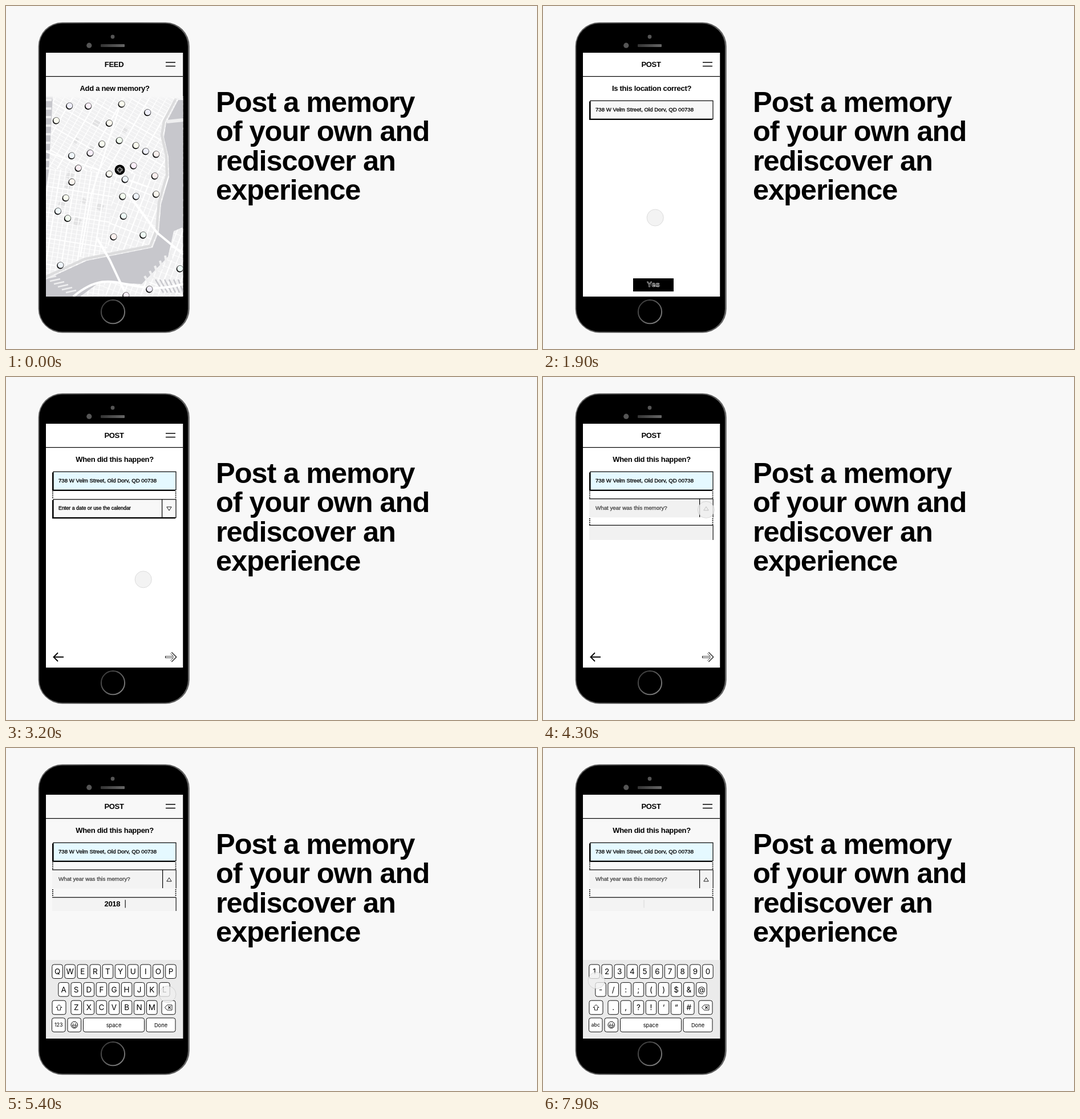
Write an HTML page with a canvas that moves like this. It is 931x602 px and loops after 8 s.

```html
<!DOCTYPE html>
<html lang="en">
<head>
<meta charset="utf-8">
<title>Post a memory</title>
<style>
  html, body { margin: 0; width: 100%; height: 100%; overflow: hidden; background: #f8f8f8; }
  canvas { display: block; }
</style>
</head>
<body>
<canvas id="stage" width="931" height="602"></canvas>
<script>
const LOOP = 8000, STEP = 100;
const FONT = '"Liberation Sans", Arial, sans-serif';
const KEY_FONT = 'Inter, "Liberation Sans", sans-serif';
const ADDRESS = '738 W Velm Street, Old Dorv, QD 00738';
const PAPER = '#f8f8f8', BLUE = '#e5f9ff';

const main = document.getElementById('stage').getContext('2d');
const buffer = Object.assign(document.createElement('canvas'), { width: 931, height: 602 }).getContext('2d');
let g = main;

const clamp = v => Math.max(0, Math.min(1, v));
const ramp = (t, from, to) => clamp((t - from) / (to - from));
const easeOut = p => 1 - Math.pow(1 - p, 2.5);
const mix = (a, b, p) => a + (b - a) * p;

function seeded(seed) {
  return (min, max) => {
    seed = (seed * 16807) % 2147483647;
    return mix(min, max, seed / 2147483647);
  };
}

function rect(x, y, w, h, color) {
  g.fillStyle = color;
  g.fillRect(x, y, w, h);
}

function paint(fill, stroke, width = 1) {
  if (fill) { g.fillStyle = fill; g.fill(); }
  if (stroke) { g.strokeStyle = stroke; g.lineWidth = width; g.stroke(); }
}

function rounded(x, y, w, h, r, fill, stroke, width) {
  g.beginPath();
  g.roundRect(x, y, w, h, r);
  paint(fill, stroke, width);
}

function circle(x, y, r, fill, stroke, width) {
  g.beginPath();
  g.arc(x, y, r, 0, Math.PI * 2);
  paint(fill, stroke, width);
}

function trace(points, closed) {
  g.beginPath();
  for (let i = 0; i < points.length; i += 2) g.lineTo(points[i], points[i + 1]);
  if (closed) g.closePath();
}

function line(points, color = '#000', width = 1, closed = false) {
  trace(points, closed);
  paint(null, color, width);
}

function shape(points, color) {
  trace(points, true);
  paint(color);
}

function text(str, x, y, font, { color = '#000', align = 'left', spacing = 0, thicken = 0 } = {}) {
  g.font = font;
  g.textAlign = align;
  g.letterSpacing = spacing + 'px';
  g.fillStyle = g.strokeStyle = color;
  g.fillText(str, x, y);
  if (thicken) { g.lineWidth = thicken; g.strokeText(str, x, y); }
  g.letterSpacing = '0px';
}

const bold = (str, x, y, align = 'center') =>
  text(str, x, y, `bold 13px ${FONT}`, { align, spacing: -0.3 });
const label = (str, y, size, color) =>
  text(str, 92, y, `${size}px ${FONT}`, { color, thicken: 0.3 });

function gradient(x0, y0, x1, y1, ...colors) {
  const fill = g.createLinearGradient(x0, y0, x1, y1);
  colors.forEach((c, i) => fill.addColorStop(i / (colors.length - 1), c));
  return fill;
}

// Draws a screen as one group, so overlapping parts fade together.
function show(draw, alpha) {
  if (alpha <= 0) return;
  if (alpha >= 1) return draw();
  g = buffer;
  g.clearRect(0, 0, 931, 602);
  draw();
  g = main;
  g.globalAlpha = alpha;
  g.drawImage(buffer.canvas, 0, 0);
  g.globalAlpha = 1;
}

/* ---------- phone ---------- */

function drawPhone() {
  rounded(56.6, 28.8, 265.2, 544.6, 42, gradient(57, 0, 321, 0, '#666', '#444', '#444', '#666'));
  rounded(58.4, 30.8, 260.6, 540.6, 40, '#000');
  circle(187, 54, 3.4, '#555');
  circle(145.8, 69.2, 4.6, '#555');
  rounded(166, 67, 42, 5, 1, gradient(166, 0, 208, 0, '#333', '#666'));
  circle(187.5, 536.7, 20.6, '#000', gradient(167, 517, 208, 557, '#333', '#888'), 2);
}

function drawHeadline() {
  ['Post a memory', 'of your own and', 'rediscover an', 'experience'].forEach((row, i) =>
    text(row, 368, 185.5 + i * 51.6, `bold 50.5px ${FONT}`, { spacing: -1.05 }));
}

function drawHeader(title, question, { back = '#fff', menu = true } = {}) {
  rect(70, 82, 240.5, 428, back);
  bold(title, 189.5, 106.6);
  if (menu) [98.2, 104.8].forEach(y => rect(280, y, 17, 1.5, '#000'));
  rect(70, 123, 240.5, 1.2, '#000');
  bold(question, 190.5, 148.7);
}

/* ---------- map ---------- */

const SHORE = [302, 165, 281, 205, 277, 230, 285, 265, 286, 300, 272, 348, 268, 396, 257, 424, 142, 447, 70, 480];
const FAR_BANK = [70, 510, 130, 510, 165, 484, 238, 488, 284, 440, 294, 395, 311, 388, 311, 165];
const BUTTON = { x: 199.5, y: 287.5 };

function scatterPins() {
  const random = seeded(77);
  const pins = [];
  while (pins.length < 28) {
    const pin = { x: random(88, 266), y: random(170, 412), hue: random(0, 360) };
    const isClear = p => Math.hypot(p.x - pin.x, p.y - pin.y) > 19;
    if ([BUTTON, ...pins].every(isClear)) pins.push(pin);
  }
  const south = [[95.5, 455], [305, 461], [251.5, 497], [210.5, 508]];
  return pins.concat(south.map(([x, y]) => ({ x, y, hue: random(0, 360) })));
}
const PINS = scatterPins();

function drawPin({ x, y, hue }) {
  circle(x - 0.4, y + 0.6, 5.9, '#000');
  circle(x + 0.2, y - 0.3, 5.3, `hsl(${hue} 60% 96%)`, '#222', 0.6);
}

function streets(region, degrees, gapAcross, gapAlong) {
  g.save();
  trace(region, true);
  g.clip();
  g.translate(190, 320);
  g.rotate(degrees * Math.PI / 180);
  for (let x = -260, i = 0; x < 260; x += gapAcross, i++) line([x, -300, x, 300], '#fff', i % 3 ? 1.3 : 2.2);
  for (let y = -300, i = 0; y < 300; y += gapAlong, i++) line([-300, y, 300, y], '#fff', i % 6 ? 0.9 : 2);
  g.restore();
}

function drawParks() {
  const random = seeded(5);
  for (let i = 0; i < 10; i++) {
    g.save();
    g.translate(random(95, 265), random(190, 420));
    g.rotate(0.5);
    rect(0, 0, random(6, 12), random(6, 15), '#e2e2e3');
    g.restore();
  }
}

function drawRivers() {
  const water = '#c7c7cc', pier = '#efeff0';
  shape([...SHORE, ...FAR_BANK], water);
  shape([70, 158, 82, 158, 75, 290, 70, 320], water);
  for (let i = 0; i < 9; i++) rect(70, 163 + i * 15, 10 - i * 0.5, 4, pier);
  for (let i = 0; i < 6; i++) {
    line([70 + i * 7, 478 + i * 5, 88 + i * 7, 474 + i * 5], pier, 2.5);
    line([250 + i * 8, 486 - i * 8, 243 + i * 9, 474 - i * 9], pier, 4);
    line([262 + i * 8, 480, 276 + i * 7, 503], water, 2.5);
  }
  line([282, 203, 311, 200], pier, 6);
}

function drawRoads() {
  g.lineJoin = 'round';
  g.save();
  g.translate(-4, -3);
  line(SHORE, '#dcdcdd', 4.5);
  g.restore();
  line([70, 256, 250, 318], '#fff', 2.5);
  line([205, 158, 150, 330, 130, 440], '#fff', 2.5);
  line([214, 330, 265, 398, 311, 436], '#fff', 4);
  line([160, 408, 182, 446, 212, 510], '#fff', 4);
  g.beginPath();
  g.moveTo(118, 510);
  g.bezierCurveTo(190, 450, 210, 515, 311, 488);
  g.stroke();
}

function mapScreen(posted) {
  drawHeader(posted ? 'POST' : 'FEED', 'Add a new memory?', { back: PAPER });
  g.save();
  g.beginPath();
  g.rect(70, 158, 240.5, 352);
  g.clip();
  rect(70, 158, 241, 352, '#f1f1f2');
  drawParks();
  streets([70, 158, 311, 158, 311, 300, 70, 285], 30, 13, 6.2);
  streets([70, 285, 190, 293, 170, 510, 70, 510], 9, 9, 7.5);
  streets([190, 293, 311, 300, 311, 510, 170, 510], 21, 9.5, 12);
  drawRivers();
  drawRoads();
  if (posted) rect(70, 158, 241, 352, 'rgba(248,248,248,.35)');
  rect(70, 158, 241, 8, gradient(0, 158, 0, 166, PAPER, 'rgba(248,248,248,0)'));
  PINS.forEach(drawPin);
  g.restore();
  if (!posted) drawAddButton();
}

function drawAddButton() {
  const { x, y } = BUTTON;
  circle(x, y, 9, '#000');
  for (const [color, reach, width] of [['#fff', 4.8, 3.8], ['#000', 4, 2.2]]) {
    line([x - reach, y, x + reach, y], color, width);
    line([x, y - reach, x, y + reach], color, width);
  }
}

/* ---------- form ---------- */

function field(y, fill) {
  rect(81, y + 1.5, 216, 32.5, '#000');
  rect(83, y, 215, 32, fill);
  g.strokeStyle = '#000';
  g.lineWidth = 1.2;
  g.strokeRect(83, y + 0.3, 215, 32);
}

function dots(from, to) {
  for (let y = from; y < to - 1; y += 3.3) {
    rect(81, y, 1.8, 1.7, '#000');
    rect(296.7, y, 1.8, 1.7, '#000');
  }
}

function addressField(fill) {
  field(166, fill);
  label(ADDRESS, 185.4, 9.65);
}

const triangle = dir => line([281.8, 231 - dir * 3, 290.2, 231 - dir * 3, 286, 231 + dir * 3.3], '#000', 0.9, true);

function arrow(tail, tip, color, width) {
  const head = tip - Math.sign(tip - tail) * 7.5;
  line([tail, 491.5, tip, 491.5], color, width);
  line([head, 484, tip, 491.5, head, 499], color, width);
}

function arrows() {
  arrow(101, 83.5, '#000', 1.8);
  arrow(279, 297, '#000', 3.6);
  arrow(279.9, 296.6, '#fff', 1.8);
}

function locationScreen() {
  drawHeader('POST', 'Is this location correct?');
  addressField(PAPER);
  rect(158, 478, 71, 23, '#000');
  g.font = `bold 13px ${FONT}`;
  g.textAlign = 'center';
  g.strokeStyle = '#fff';
  g.lineWidth = 0.6;
  g.strokeText('Yes', 193.5, 493.3);
}

function dateScreen() {
  drawHeader('POST', 'When did this happen?');
  addressField(BLUE);
  dots(201, 214);
  field(214.5, PAPER);
  label('Enter a date or use the calendar', 233.4, 8.9);
  rect(273, 214.5, 1.2, 32, '#000');
  triangle(1);
  arrows();
}

function openPanel(y, bottom, fill) {
  rect(81, y, 217, bottom - y, fill);
  rect(81, y - 0.4, 217, 1.2, '#000');
  rect(297.6, y, 1.1, bottom - y, '#000');
}

function yearFields(fill, panelY) {
  addressField(BLUE);
  dots(201, 213);
  openPanel(213.6, 246.5, fill);
  rect(274, 214, 1.2, 32, '#000');
  label('What year was this memory?', 233.4, 9.75, '#444');
  triangle(-1);
  dots(248, panelY);
  openPanel(panelY, 286, fill);
}

function yearScreen() {
  drawHeader('POST', 'When did this happen?', { menu: false });
  yearFields('#f1f1f1', 260);
  arrows();
}

/* ---------- keyboard ---------- */

const LETTERS = ['QWERTYUIOP', 'ASDFGHJKL', 'ZXCVBNM'];
const SYMBOLS = ['1234567890', '-/:;()$&@', '.,?!‘“#'];
const KEY_PITCH = 22.1;

function key(x, y, w, str = '', size = 13.5) {
  rounded(x, y, w, 24.5, 3.5, '#fff', '#111');
  text(str, x + w / 2, y + 12.4 + size * 0.36, `${size}px ${KEY_FONT}`, { align: 'center' });
}

function shiftIcon() {
  line([93, 450.5, 98, 455.6, 95.5, 455.6, 95.5, 460, 90.5, 460, 90.5, 455.6, 88, 455.6], '#000', 0.9, true);
}

function backspaceIcon() {
  line([278.5, 455.5, 282.5, 451, 291, 451, 291, 460, 282.5, 460], '#000', 0.9, true);
  for (const d of [-2.2, 2.2]) line([286.5 - d, 453.3, 286.5 + d, 457.7], '#000', 1.2);
}

function smileIcon(x, y) {
  circle(x, y, 5.8, null, '#000');
  for (const d of [-2.2, 2.2]) circle(x + d, y - 1.6, 0.8, '#000');
  g.beginPath();
  g.arc(x, y + 0.6, 3.5, 0, Math.PI);
  g.closePath();
  g.stroke();
}

function keyboard(numeric) {
  rect(70, 372, 240.5, 138, '#ebebeb');
  (numeric ? SYMBOLS : LETTERS).forEach((row, r) => {
    const left = 191.3 - row.length * KEY_PITCH / 2;
    [...row].forEach((ch, i) => key(left + i * KEY_PITCH, 380 + r * 31.6, 18.5, ch));
  });
  key(81, 443.2, 24);
  shiftIcon();
  key(273, 443.2, 24);
  backspaceIcon();
  key(80.5, 473.8, 23.5, numeric ? 'abc' : '123', 9);
  key(108, 473.8, 23.5);
  smileIcon(119.8, 486);
  key(135.5, 473.8, 107, 'space', 9.3);
  key(246, 473.8, 51, 'Done', 9.3);
}

function typingScreen(t) {
  drawHeader('POST', 'When did this happen?', { back: PAPER });
  yearFields('#f3f3f3', 262);
  const erased = Math.max(0, Math.floor((t - 5700) / 200));
  const typed = '2018'.slice(0, Math.max(0, 4 - erased));
  bold(typed, 172.5, 278, 'left');
  const caretX = typed ? 179.7 + g.measureText(typed).width : 176.5;
  const blink = 0.55 + 0.45 * Math.cos((t - 5400) * Math.PI / 500);
  rect(caretX, 266.5, 1.1, 14, `rgba(0,0,0,${blink})`);
  keyboard(false);
  show(() => keyboard(true), ramp(t, 7300, 7600));
}

/* ---------- touch point ---------- */

const TOUCH_START = { x: 287, y: 355 };
const MOVES = [
  { at: 200, ...BUTTON },
  { at: 1800, x: 193, y: 484 },
  { at: 3075, x: 286, y: 233 },
  { at: 5110, x: 283, y: 458 },
  { at: 6750, x: 95, y: 488 },
  { at: 7600, x: 93.5, y: 399 }
];

function drawTouch(t) {
  if (t < 200) return;
  let { x, y } = TOUCH_START;
  for (const move of MOVES) {
    const p = easeOut(ramp(t, move.at, move.at + 500));
    x = mix(x, move.x, p);
    y = mix(y, move.y, p);
  }
  circle(x, y, 14.6, 'rgba(240,240,240,.78)', 'rgba(0,0,0,.13)', 0.9);
}

/* ---------- timeline ---------- */

const SCREENS = [
  { draw: t => mapScreen(t >= 1200), from: -1, to: 0 },
  { draw: locationScreen, from: 1200, to: 1500 },
  { draw: dateScreen, from: 2400, to: 3000 },
  { draw: yearScreen, from: 3500, to: 4000 },
  { draw: typingScreen, from: 4400, to: 5000 }
];

function render(t) {
  rect(0, 0, 931, 602, PAPER);
  drawPhone();
  drawHeadline();
  g.save();
  g.beginPath();
  g.rect(69.5, 82, 241, 428);
  g.clip();
  SCREENS.forEach(({ draw, from, to }, i) => {
    const covered = SCREENS[i + 1] && t >= SCREENS[i + 1].to;
    if (!covered) show(() => draw(t), ramp(t, from, to));
  });
  drawTouch(t);
  g.restore();
}

const begin = performance.now();
function tick() {
  const t = (performance.now() - begin) % LOOP;
  render(Math.floor(t / STEP) * STEP);
  requestAnimationFrame(tick);
}
tick();
</script>
</body>
</html>
```
